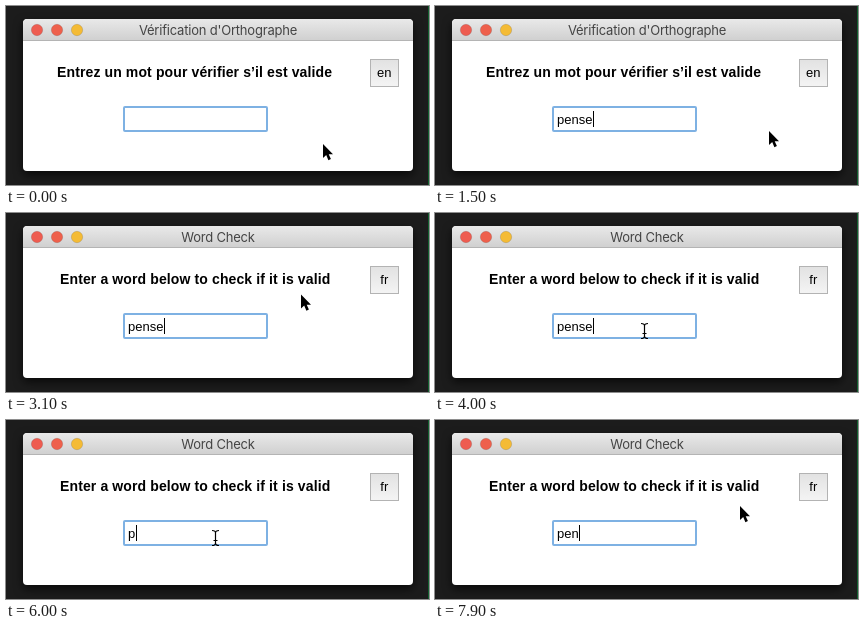
These frames come from a looping animation (423x179 px, 8000 ms). An HTML page:

```html
<!DOCTYPE html>
<html lang="fr">
<head>
<meta charset="utf-8">
<title>Word Check</title>
<style>
html, body { margin: 0; width: 100%; height: 100%; overflow: hidden; background: #1c1c1c; }
svg { display: block; width: 423px; height: 179px; }
text { font: 13px "Liberation Sans", Arial, sans-serif; white-space: pre; }
#title { font: 13px Inter, sans-serif; letter-spacing: -.2px; fill: #444; text-anchor: middle; }
#heading { font-weight: bold; font-size: 14px; letter-spacing: .12px; }
#button { text-anchor: middle; }
#message { fill: #cb2a27; }
.window { filter: drop-shadow(0 4px 5px #000a); }
</style>
</head>
<body>
<svg viewBox="0 0 423 179">
  <defs>
    <linearGradient id="bar" x2="0" y2="1">
      <stop stop-color="#e9e9e9"/><stop offset="1" stop-color="#cfcfcf"/>
    </linearGradient>
    <linearGradient id="face" x2="0" y2="1">
      <stop stop-color="#e2e2e2"/><stop offset="1" stop-color="#f4f4f4"/>
    </linearGradient>
  </defs>
  <rect width="423" height="179" fill="#1c1c1c"/>
  <rect x="422" width="1" height="179" fill="#12602f"/>
  <rect class="window" x="17" y="13" width="390" height="152" rx="4" fill="#fff"/>
  <path d="M17 35V18q0-5 5-5H402q5 0 5 5V35z" fill="url(#bar)"/>
  <path d="M17 34.5H407" stroke="#b4b4b4"/>
  <g stroke-opacity=".12" stroke="#000">
    <circle cx="31" cy="24" r="5.7" fill="#ee5c50"/>
    <circle cx="51" cy="24" r="5.7" fill="#ee604c"/>
    <circle cx="71" cy="24" r="5.7" fill="#f4bb35"/>
  </g>
  <text id="title" x="212" y="29"/>
  <text id="heading" y="71"/>
  <rect x="364.5" y="53.5" width="28" height="27" fill="url(#face)" stroke="#b3b3b3"/>
  <text id="button" x="378.3" y="71"/>
  <rect x="118" y="101" width="143" height="24" rx="1" fill="#fff" stroke="#7eb1e3" stroke-width="2"/>
  <text id="entry" x="122" y="118"/>
  <rect id="caret" y="105" width="1" height="16"/>
  <text id="message" x="131.5" y="143">Pas un m   d valide!</text>
  <path id="arrow" d="M0 0V14L3.2 11 5.4 16.2 7.9 15.1 5.7 10.2H10z" stroke="#fff" stroke-width="1.2" paint-order="stroke"/>
  <path id="beam" d="M-3.5-7.5Q0-7.5 0-5 0-7.5 3.5-7.5M0-5.5V5.5M-3.5 7.5Q0 7.5 0 5 0 7.5 3.5 7.5M-2 2.5H2" fill="none" stroke="#000" stroke-width="1.2"/>
</svg>
<script>
const LOOP = 8000;
const CARET_ON = 600, CARET_CYCLE = 900;
const SWITCH = 2200;
const $ = id => document.getElementById(id);

const french = { title: "Vérification d'Orthographe", heading: "Entrez un mot pour vérifier s’il est valide", x: 51, button: "en" };
const english = { title: "Word Check", heading: "Enter a word below to check if it is valid", x: 54, button: "fr" };

// [time, entry content]
const typing = [
  [0, ""], [200, "p"], [500, "pe"], [600, "pen"], [900, "pens"], [1000, "pense"],
  [SWITCH, "pense"], [5100, "pens"], [5700, "pen"], [5900, "pe"], [6000, "p"], [6100, ""],
  [6600, "p"], [6700, "pe"], [6900, "pen"]
];

// [time, x, y] of the pointer
const pointer = [
  [0, 317, 138], [1300, 317, 138], [1500, 334, 125], [1700, 363, 88], [1900, 375, 69.5],
  [3000, 375, 69.5], [3100, 295, 81.5], [3300, 228, 108], [3500, 209.5, 118],
  [7600, 209.5, 118], [7700, 232, 108], [7800, 280, 94], [7900, 305, 86], [LOOP, 305, 86]
];

function pointerAt(t) {
  const i = pointer.findIndex(p => p[0] > t);
  const [t0, x0, y0] = pointer[i - 1], [t1, x1, y1] = pointer[i];
  const k = (t - t0) / (t1 - t0);
  return [x0 + (x1 - x0) * k, y0 + (y1 - y0) * k];
}

function show(id, visible) {
  $(id).style.display = visible ? "" : "none";
}

function draw(t) {
  const language = t < SWITCH ? french : english;
  for (const id of ["title", "heading", "button"]) $(id).textContent = language[id];
  $("heading").setAttribute("x", language.x);

  const [since, word] = typing.findLast(key => key[0] <= t);
  $("entry").textContent = word;
  $("caret").setAttribute("x", Math.round(122.4 + (word ? $("entry").getComputedTextLength() : 0)));
  show("caret", t >= 100 && (t - since) % CARET_CYCLE < CARET_ON);
  show("message", t >= 200 && t < 1100);

  const [x, y] = pointerAt(t);
  const overEntry = x > 117 && x < 262 && y > 100 && y < 126;
  show("arrow", !overEntry);
  show("beam", overEntry);
  $(overEntry ? "beam" : "arrow").setAttribute("transform", `translate(${x} ${y})`);
}

const start = performance.now();
function tick() {
  const elapsed = (performance.now() - start) % LOOP;
  draw(Math.floor(elapsed / 100) * 100);
  requestAnimationFrame(tick);
}
tick();
</script>
</body>
</html>
```
